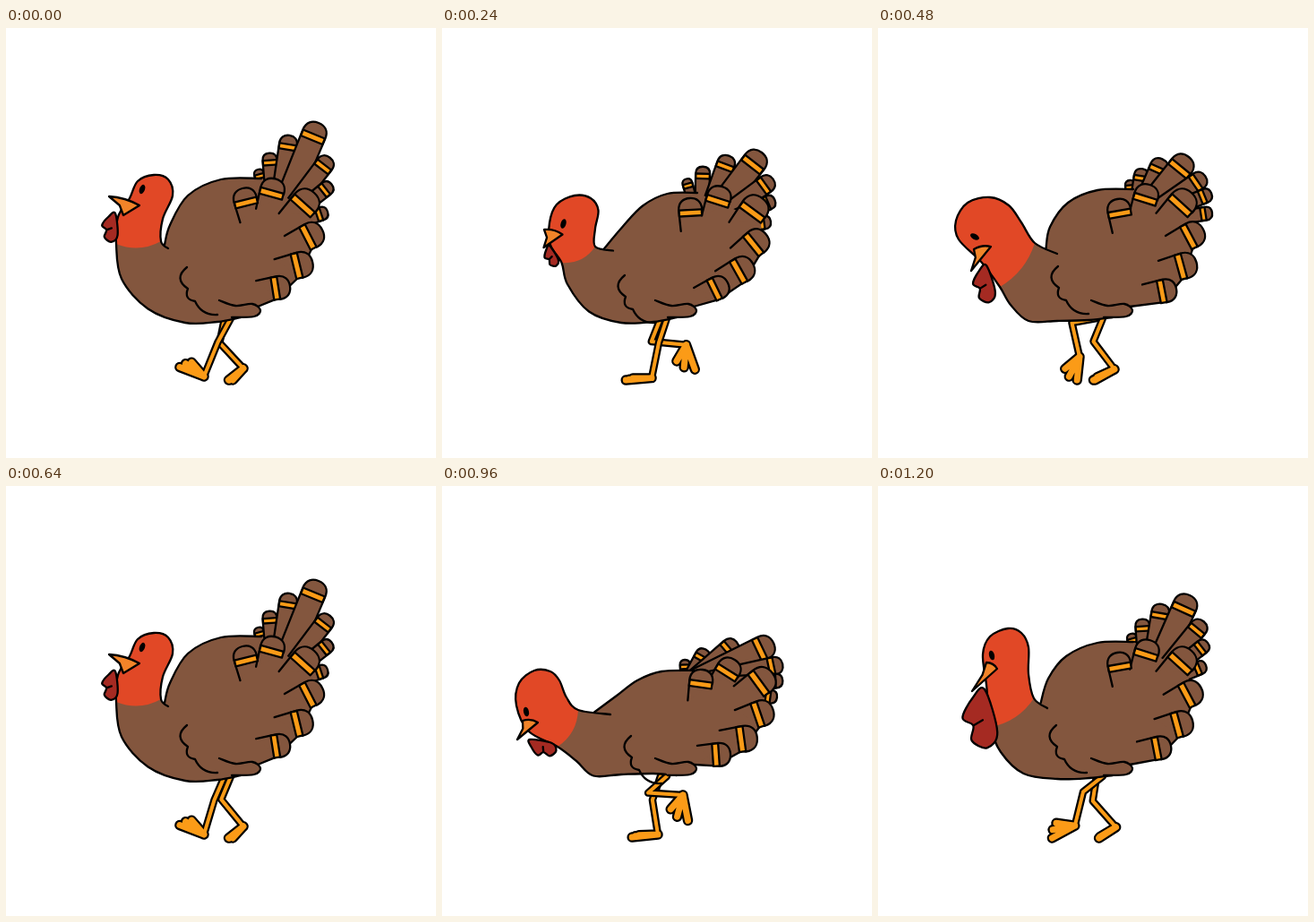
Write an HTML page with a canvas that moves like this. It is 480x480 px and loops after 1.28 s.

```html
<!DOCTYPE html>
<html lang="en">
<head>
<meta charset="utf-8">
<title>Walking turkey</title>
<style>
html, body { margin: 0; width: 100%; height: 100%; overflow: hidden; background: #fff; }
canvas { display: block; width: 480px; height: 480px; }
</style>
</head>
<body>
<canvas id="stage" width="480" height="480"></canvas>
<script>
const ctx = document.getElementById('stage').getContext('2d');
const BROWN = '#83563e', RED = '#e14826', ORANGE = '#fb9b17', BEAK = '#f28429', WATTLE = '#a52a22';
const STEP = 80, STEPS = 16, BOB = 8, GROUND = 393, LINE = 2.3;
const rad = deg => deg * Math.PI / 180;

// Key points of the bob. neck: nape to chest; back: hump;
// fan: ends of the back row (3) and of the front row (3); lean: angles at the ends of the front row.
const poses = {
  0: {
    neck: [181,246, 173,238, 175,213, 186,187, 181,169, 165,164, 147,171, 138,190, 125,211, 123,241, 129,280],
    belly: [329], back: [240,169, 203,187, 183,220],
    beak: [115,188, 149,198, 131,209], eye: [152,180,20], wattle: [122,207, 119,239], wing: [202,267],
    fan: [281,158, 349,106, 359,205, 264,179, 344,184, 317,288], root: [300,225], lean: [-104,-9]
  },
  2: {
    neck: [194,242, 190,238, 203,212, 218,190, 211,173, 193,168, 170,174, 157,190, 145,210, 138,233, 130,265],
    belly: [336], back: [258,163, 230,180, 207,211],
    beak: [138,188, 162,197, 143,207], eye: [177,185,45], wattle: [142,203, 129,236], wing: [197,273],
    fan: [274,143, 344,103, 360,196, 262,175, 346,171, 316,270], root: [306,232], lean: [-104,-48]
  },
  4: {
    neck: [188,255, 152,250, 139,236, 131,217, 121,207, 103,206, 86,220, 83,245, 97,274, 129,291, 150,307],
    belly: [322], back: [245,207, 218,217, 195,234],
    beak: [90,262, 107,264, 84,283], eye: [94,252,-12], wattle: [98,283, 128,294], wing: [211,279],
    fan: [271,194, 370,175, 374,236, 291,205, 369,209, 322,299], root: [272,222], lean: [-82,-4]
  },
  6: {
    neck: [200,252, 175,240, 160,217, 146,198, 125,189, 100,195, 87,215, 90,236, 116,262, 136,289, 148,309],
    belly: [327], back: [245,181, 212,195, 192,222],
    beak: [107,247, 126,244, 104,271], eye: [108,233,-62], wattle: [121,265, 126,306], wing: [201,266],
    fan: [281,170, 347,144, 373,206, 267,191, 350,184, 333,291], root: [285,220], lean: [-100,-11]
  },
  7: {
    neck: [189,248, 174,237, 168,210, 168,180, 160,164, 145,159, 125,168, 117,188, 121,222, 126,269, 137,297],
    belly: [327], back: [245,175, 210,190, 190,215],
    beak: [121,197, 133,204, 105,229], eye: [127,189,-15], wattle: [119,227, 125,292], wing: [199,267],
    fan: [282,165, 348,122, 366,200, 267,186, 350,184, 327,290], root: [300,228], lean: [-100,-11]
  }
};

// One leg's cycle, a key every two steps.
const ANKLE_X = [221, 229, 241, 264, 265, 270, 269, 225];
const ANKLE_Y = [389, 391, 389, 381, 380, 367, 345, 367];
const FOOT = [215, 178, 176, 150, 128, 92, 105, 118];

const BACK_WIDTHS = [11, 16, 20, 27, 20, 16, 15];
const FRONT_WIDTHS = [26, 27, 31, 29, 29, 26];
const TUFT = [238,304, 256,310, 275,308, 284,315, 277,322, 252,323];
const LOBES = [0,0, .13,.22, .45,.42, .6,.25, .85,.3, 1,.05, .75,-.15];

function bobPose(step) {
  const keys = Object.keys(poses).map(Number);
  const a = keys.filter(k => k <= step).pop();
  const b = keys.find(k => k > step) || BOB;
  const k = (step - a) / (b - a), out = {};
  for (const part in poses[a])
    out[part] = poses[a][part].map((v, i) => v + (poses[b % BOB][part][i] - v) * k);
  return out;
}

// Cyclic Catmull-Rom through evenly spaced values.
function cycle(keys, t) {
  const n = keys.length, i = Math.floor(t), u = t - i;
  const [a, b, c, d] = [-1, 0, 1, 2].map(j => keys[(i + j + n) % n]);
  return b + u / 2 * (c - a + u * (2 * a - 5 * b + 4 * c - d + u * (3 * (b - c) + d - a)));
}

const pt = (p, i) => [p[2 * i], p[2 * i + 1]];

// Point on a bowed line from a to b that bulges by k pixels.
function bow(a, b, u, k) {
  const dx = b[0] - a[0], dy = b[1] - a[1], h = 4 * u * (1 - u) * k / Math.hypot(dx, dy);
  return [a[0] + dx * u + dy * h, a[1] + dy * u - dx * h];
}

function bowTo(path, a, b, k) {
  path.quadraticCurveTo(...bow(a, b, .5, 2 * k), ...b);
}

function smooth(path, p, from = 0, to = p.length / 2 - 1, join = false, closed = false) {
  const n = p.length / 2;
  const at = i => pt(p, closed ? (i + n) % n : Math.max(0, Math.min(n - 1, i)));
  path[join ? 'lineTo' : 'moveTo'](...at(from));
  for (let i = from; i < to + closed; i++) {
    const [a, b, c, d] = [at(i - 1), at(i), at(i + 1), at(i + 2)];
    path.bezierCurveTo(b[0] + (c[0] - a[0]) / 6, b[1] + (c[1] - a[1]) / 6,
      c[0] - (d[0] - b[0]) / 6, c[1] - (d[1] - b[1]) / 6, c[0], c[1]);
  }
  return path;
}

function paint(path, fill) {
  ctx.fillStyle = fill;
  ctx.fill(path);
  ctx.stroke(path);
}

function fanFeathers(b) {
  const [a, d, h, i, k, n] = [0, 1, 2, 3, 4, 5].map(j => pt(b.fan, j));
  const back = [0, .25, .6, 1].map(u => bow(a, d, u, 9))
    .concat([.4, .7, 1].map(u => bow(d, h, u, 9)))
    .map((tip, j) => {
      const dx = tip[0] - b.root[0], dy = tip[1] - b.root[1], len = Math.hypot(dx, dy);
      return { tip, w: BACK_WIDTHS[j], angle: Math.atan2(dy, dx), left: len, right: len };
    });
  const front = [0, .45, 1].map(u => bow(i, k, u, 13))
    .concat([.35, .7, 1].map(u => bow(k, n, u, 21)))
    .map((tip, j) => {
      const w = FRONT_WIDTHS[j], turn = Math.sin(j / 5 * Math.PI / 2);
      return { tip, w, angle: rad(b.lean[0] + (b.lean[1] - b.lean[0]) * turn), left: w * 1.4, right: w * .65 };
    });
  return { back, front };
}

function feather({ tip, w, angle, left, right }) {
  const h = w / 2, stripe = w * .15 + 3;
  ctx.save();
  ctx.translate(...tip);
  ctx.rotate(angle);
  const shape = new Path2D(), band = new Path2D();
  shape.moveTo(-left, -h * .9);
  shape.lineTo(-h, -h);
  shape.bezierCurveTo(-w * .15, -h, 0, -w * .28, 0, 0);
  shape.bezierCurveTo(0, w * .28, -w * .15, h, -h, h);
  shape.lineTo(-right, h * .9);
  paint(shape, BROWN);
  band.rect(-h - stripe, -h * .97, stripe, h * 1.94);
  paint(band, ORANGE);
  ctx.restore();
}

// Lower corner of a feather, where it meets the rump.
function corner({ tip, w, angle }) {
  const c = Math.cos(angle), s = Math.sin(angle);
  return [tip[0] - w * (.7 * c + .47 * s), tip[1] - w * (.7 * s - .47 * c)];
}

function leg(step, hipX) {
  const t = step % STEPS / 2, x = cycle(ANKLE_X, t), y = cycle(ANKLE_Y, t);
  const pitch = cycle(FOOT, t), spread = 14 - 12 * Math.cos((step - 4) / STEPS * 2 * Math.PI);
  // Two-bone bend with the knee to the left.
  const hip = [hipX, 324], thigh = 28, shank = 39;
  const dx = x - hip[0], dy = y - hip[1], dist = Math.hypot(dx, dy);
  const along = Math.min(dist * .42, (dist * dist + thigh * thigh - shank * shank) / (2 * dist));
  const out = dist < thigh + shank ? Math.sqrt(Math.max(0, thigh * thigh - along * along)) : 2;
  const shin = new Path2D(), foot = new Path2D();
  shin.moveTo(...hip);
  shin.lineTo(hip[0] + (dx * along - dy * out) / dist, hip[1] + (dy * along + dx * out) / dist);
  shin.lineTo(x, y);
  for (let i = 0; i < 3; i++) {
    const a = rad(pitch + (i - 1) * spread), len = 29 - 4 * i;
    foot.moveTo(x, y);
    foot.lineTo(x + len * Math.cos(a), Math.min(GROUND, y + len * Math.sin(a)));
  }
  for (const [color, thin, thick] of [['#000', 8.5, 11.5], [ORANGE, 4, 7]]) {
    ctx.strokeStyle = color;
    ctx.lineWidth = thin;
    ctx.stroke(shin);
    ctx.lineWidth = thick;
    ctx.stroke(foot);
  }
  ctx.strokeStyle = '#000';
  ctx.lineWidth = LINE;
}

function torso(b, front) {
  const n = b.neck, low = b.belly[0];
  const outline = [...n, (n[20] + 200) / 2 - 6, (n[21] + low) / 2 + 9, 200, low, 236, low - 1, 262, 323];
  const hump = [285, b.back[1] - 1, ...b.back, (n[0] + n[2]) / 2, (n[1] + n[3]) / 2];
  const fill = smooth(new Path2D(), outline), rump = new Path2D();
  fill.lineTo(281, 311);
  rump.moveTo(281, 311);
  for (const f of front.slice(2).reverse()) {
    fill.lineTo(...corner(f));
    if (f !== front[2]) rump.lineTo(...corner(f));
  }
  smooth(fill, hump, 0, 4, true);
  ctx.fillStyle = BROWN;
  ctx.fill(fill);
  paint(rump, BROWN);
  const red = smooth(new Path2D(), outline, 1, 9);
  bowTo(red, pt(n, 9), pt(n, 1), -6);
  ctx.fillStyle = RED;
  ctx.fill(red);
  ctx.stroke(smooth(new Path2D(), outline));
  ctx.stroke(smooth(new Path2D(), hump));
}

function wing([x, y]) {
  const knots = [[0, 0], [1, 24], [9, 38], [34, 53]].map(k => [x + k[0], y + k[1]]);
  const path = new Path2D();
  for (let i = 0; i < 3; i++) {
    path.moveTo(...knots[i]);
    bowTo(path, knots[i], knots[i + 1], i ? -5 : -8);
  }
  ctx.stroke(path);
}

function face(b) {
  const [x, y, ex, ey] = b.wattle, dx = ex - x, dy = ey - y, lobes = [];
  for (let i = 0; i < LOBES.length; i += 2) {
    const [u, v] = [LOBES[i], LOBES[i + 1]];
    lobes.push(x + dx * u - dy * v, y + dy * u + dx * v);
  }
  const flap = smooth(new Path2D(), lobes, 0, 6, false, true);
  flap.moveTo(...pt(lobes, 3));
  flap.lineTo(x + dx * .52 - dy * .08, y + dy * .52 + dx * .08);
  paint(flap, WATTLE);

  const [top, hinge, low] = [0, 1, 2].map(i => pt(b.beak, i));
  const beak = new Path2D();
  beak.moveTo(...top);
  bowTo(beak, top, hinge, 2);
  beak.lineTo(...low);
  beak.lineTo(...[0, 1].map(i => top[i] * .44 + low[i] * .4 + hinge[i] * .16));
  beak.closePath();
  paint(beak, BEAK);

  ctx.fillStyle = '#000';
  ctx.beginPath();
  ctx.ellipse(b.eye[0], b.eye[1], 3, 5.4, rad(b.eye[2]), 0, 2 * Math.PI);
  ctx.fill();
}

function draw(step) {
  const b = bobPose(step % BOB), { back, front } = fanFeathers(b);
  ctx.fillStyle = '#fff';
  ctx.fillRect(0, 0, 480, 480);
  ctx.lineCap = ctx.lineJoin = 'round';
  ctx.strokeStyle = '#000';
  ctx.lineWidth = LINE;
  leg(step + STEPS / 2, 244);
  leg(step, 251);
  back.forEach(feather);
  torso(b, front);
  [...front].reverse().forEach(feather);
  paint(smooth(new Path2D(), TUFT), BROWN);
  wing(b.wing);
  face(b);
}

const start = performance.now();
function tick() {
  draw(Math.floor((performance.now() - start) / STEP) % STEPS);
  requestAnimationFrame(tick);
}
tick();
</script>
</body>
</html>
```
